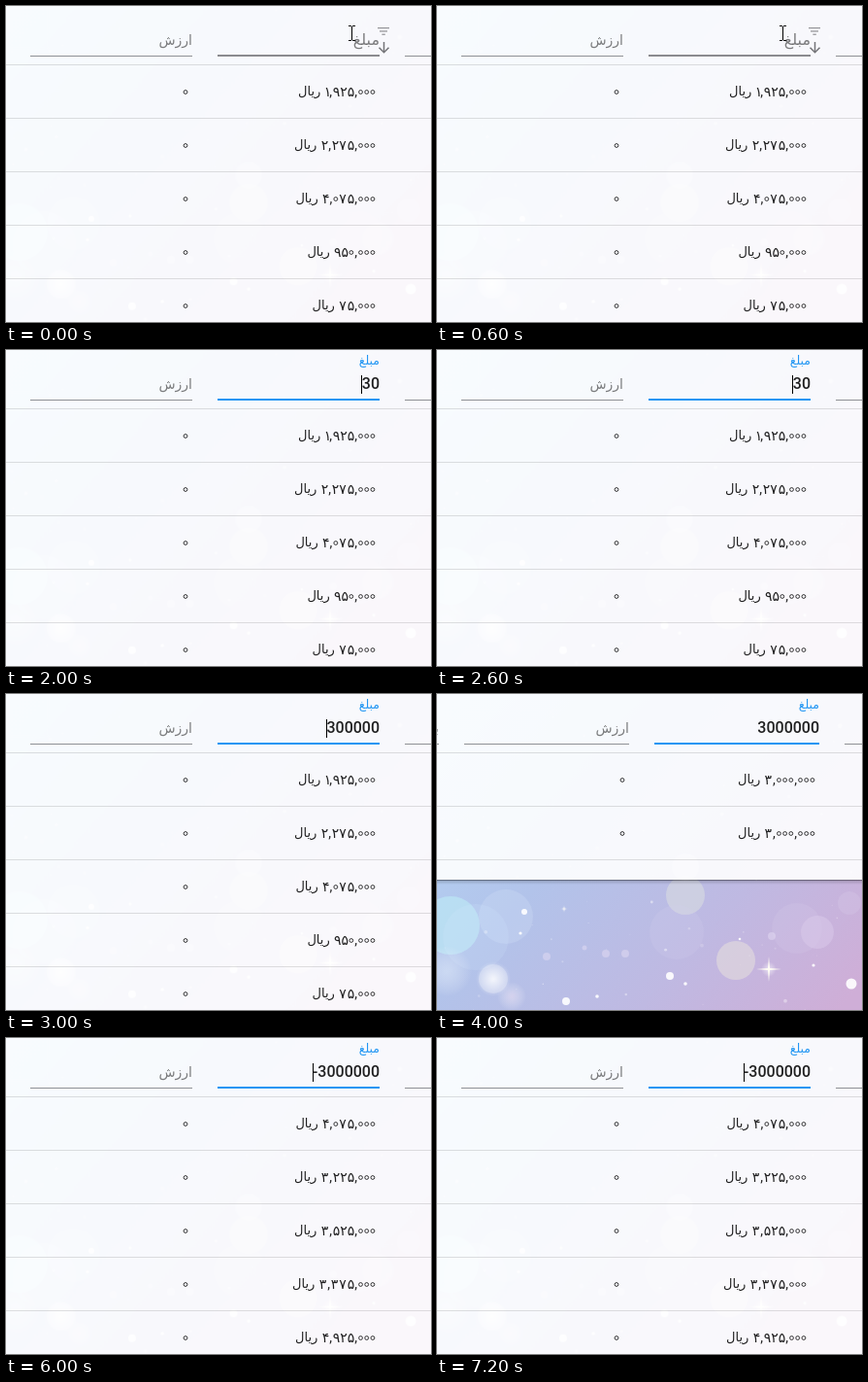
An HTML page with a canvas for the animation above (8 s loop, 438 by 325 pixels).

```html
<!DOCTYPE html>
<html lang="fa">
<head>
<meta charset="utf-8">
<title>Column filter</title>
<style>
  html, body { margin: 0; width: 100%; height: 100%; overflow: hidden; background: #fff; }
  canvas { display: block; }
</style>
</head>
<body>
<canvas id="stage" width="438" height="325"></canvas>
<script>
const W = 438, H = 325, LOOP = 8000;
const SHRINK = .977; // the page is narrower while the scrollbar shows
const BLUE = '#2196f3', INK = 'rgba(0,0,0,.87)', GREY = 'rgba(0,0,0,.5)';
const ARABIC = '"DejaVu Sans", sans-serif', LATIN = 'Roboto, sans-serif';
const ctx = document.getElementById('stage').getContext('2d');

const ALL = ['۱,۹۲۵,۰۰۰', '۲,۲۷۵,۰۰۰', '۴,۰۷۵,۰۰۰', '۹۵۰,۰۰۰', '۷۵,۰۰۰'];
const EXACT = ['۳,۰۰۰,۰۰۰', '۳,۰۰۰,۰۰۰'];
const ABOVE = ['۴,۰۷۵,۰۰۰', '۳,۲۲۵,۰۰۰', '۳,۵۲۵,۰۰۰', '۳,۳۷۵,۰۰۰', '۴,۹۲۵,۰۰۰'];

const STATES = [
  { at: 0, rows: ALL, idle: true },
  { at: 1000, rows: ALL, value: '' },
  { at: 2000, rows: ALL, value: '30', caret: true },
  { at: 3000, rows: ALL, value: '300000', caret: true },
  { at: 4000, rows: EXACT, value: '3000000', short: true },
  { at: 6000, rows: ABOVE, value: '-3000000', caret: true }
];

function rect(g, x, y, w, h, color) {
  g.fillStyle = color;
  g.fillRect(x, y, w, h);
}

function disc(g, x, y, r, color, alpha, soft) {
  g.globalAlpha = alpha;
  g.fillStyle = color;
  if (soft) {
    const glow = g.createRadialGradient(x, y, 0, x, y, r);
    glow.addColorStop(0, color);
    glow.addColorStop(1, 'rgba(255,255,255,0)');
    g.fillStyle = glow;
  }
  g.beginPath();
  g.arc(x, y, r, 0, Math.PI * 2);
  g.fill();
  g.globalAlpha = 1;
}

function star(g, x, y, r) {
  disc(g, x, y, r * .6, '#fff', .6, true);
  g.fillStyle = '#fffdf4';
  g.beginPath();
  for (let i = 0; i < 8; i++) {
    const a = i * Math.PI / 4, d = i % 2 ? r * .11 : r;
    g.lineTo(x + d * Math.cos(a), y + d * Math.sin(a));
  }
  g.fill();
}

function makeBackdrop() {
  const c = document.createElement('canvas');
  c.width = Math.ceil(W / SHRINK);
  c.height = Math.ceil(H / SHRINK);
  const g = c.getContext('2d');
  const sky = g.createLinearGradient(20, 0, 400, 340);
  sky.addColorStop(0, '#b4d6f6');
  sky.addColorStop(.38, '#b2c3ea');
  sky.addColorStop(.7, '#bfb9e2');
  sky.addColorStop(1, '#cfaed7');
  rect(g, 0, 0, c.width, c.height, sky);

  disc(g, 14, 238, 30, '#bdeaf6', .65);
  disc(g, 71, 229, 28, '#cfdcf5', .3);
  disc(g, 256, 207, 20, '#d9dde2', .6);
  disc(g, 247, 245, 28, '#d2cdea', .2);
  disc(g, 371, 241, 26, '#d3c6e8', .25);
  disc(g, 392, 245, 17, '#dccdec', .45);
  disc(g, 308, 274, 20, '#e2dade', .65);
  disc(g, 425, 215, 12, '#dcd0ea', .25);
  disc(g, 40, 250, 34, '#d3e8fa', .15);
  disc(g, 256, 178, 14, '#ffffff', .22);
  disc(g, 58, 293, 18, '#ffffff', .8, true);
  disc(g, 58, 293, 15, '#ffffff', .25);
  disc(g, 10, 285, 26, '#e4eefa', .5, true);
  disc(g, 77, 311, 15, '#f4e4f4', .5, true);

  // bright sparks
  for (const [x, y, r] of [[90, 224, 3], [86, 246, 1.6], [240, 290, 4], [133, 316, 4],
    [427, 298, 5.5], [165, 311, 1.8], [256, 298, 1.8], [312, 252, 1.3], [388, 279, 1.6]])
    disc(g, x, y, r, '#fff', .9);
  for (const [x, y, r] of [[113, 270, 4], [345, 249, 4], [174, 267, 4], [194, 267, 4], [152, 261, 2.5]])
    disc(g, x, y, r, '#e4dcf4', .5);

  let seed = 11;
  const rnd = () => (seed = seed * 16807 % 2147483647) / 2147483647;
  for (let i = 0; i < 90; i++)
    disc(g, rnd() * c.width, rnd() * c.height, .4 + rnd() * rnd() * 2, '#fff', .1 + rnd() * .35);

  star(g, 342, 283, 13);
  star(g, 131, 221, 4);
  return c;
}

function rtl(text, x, y, size, color) {
  ctx.font = size + 'px ' + ARABIC;
  ctx.direction = 'rtl';
  ctx.textAlign = 'right';
  ctx.fillStyle = color;
  ctx.fillText(text, x, y);
}

function zero(x, y) {
  ctx.strokeStyle = INK;
  ctx.lineWidth = .9;
  ctx.beginPath();
  ctx.arc(x, y, 1.9, 0, Math.PI * 2);
  ctx.stroke();
}

// Sets digits from right to left, spaced by their ink; returns the left edge.
function number(text, right, base) {
  const gap = .5;
  let x = right;
  ctx.direction = 'ltr';
  ctx.textAlign = 'left';
  for (const ch of [...text].reverse()) {
    if (ch === '۰') {
      zero(x - 3.1, base - 4.5);
      x -= 6.2;
      continue;
    }
    ctx.font = '14px ' + (ch === ',' ? LATIN : ARABIC);
    ctx.fillStyle = INK;
    const m = ctx.measureText(ch);
    ctx.fillText(ch, x - gap / 2 - m.actualBoundingBoxRight, base);
    x -= m.actualBoundingBoxLeft + m.actualBoundingBoxRight + gap;
  }
  return x;
}

function strokePath(points, color, width) {
  ctx.strokeStyle = color;
  ctx.lineWidth = width;
  ctx.beginPath();
  for (const [x, y] of points) ctx.lineTo(x, y);
  ctx.stroke();
}

function drawIdleField() {
  rtl('مبلغ', 385, 40, 16, GREY);
  rect(ctx, 218, 50, 167, 2, '#8b8b8f');
  rect(ctx, 383, 22, 12, 1.3, '#98989c');
  rect(ctx, 385, 25.3, 8, 1.3, '#98989c');
  rect(ctx, 387.4, 28.6, 3.4, 1.3, '#98989c');
  strokePath([[389.5, 37], [389.5, 47.5]], '#747478', 1.5);
  strokePath([[384.5, 42.8], [389.5, 47.8], [394.5, 42.8]], '#747478', 1.5);
  // text cursor
  rect(ctx, 356, 21, 1, 14, '#000');
  for (const y of [20, 35]) {
    rect(ctx, 353, y, 3, 1, '#000');
    rect(ctx, 357, y, 3, 1, '#000');
  }
}

function drawActiveField(s, right, width) {
  rtl('مبلغ', right, 15, 12.5, BLUE);
  rect(ctx, right - width, 50, width, 2, BLUE);
  ctx.font = '500 16px ' + LATIN;
  ctx.direction = 'ltr';
  ctx.textAlign = 'right';
  ctx.fillStyle = INK;
  ctx.fillText(s.value, right, 40);
  if (s.caret)
    rect(ctx, Math.floor(right - ctx.measureText(s.value).width), 26, 1, 19, '#000');
}

function drawTable(s) {
  const right = s.short ? 394 : 385, side = s.short ? 198 : 192;
  const width = s.short ? 170 : 167, rule = '#8f9195';

  rtl('ارزش', side, 40, 14, GREY);
  rect(ctx, side - width, 51, width, 1, rule);
  rect(ctx, right + 26, 51, W, 1, rule);
  if (s.short) {
    rtl('بها', 2, 40, 14, GREY);
    rect(ctx, 0, 51, 2, 1, rule);
  }
  if (s.idle) drawIdleField();
  else drawActiveField(s, right, width);

  rect(ctx, 0, 60, W, 1, 'rgba(0,0,0,.12)');
  s.rows.forEach((amount, i) => {
    const y = 88 + i * 55;
    const left = number(amount, right - 4, y + 5);
    rtl('ریال', left - 4, y + 4, 13, INK);
    zero(side - 7, y + .5);
    rect(ctx, 0, y + 27, W, 1, 'rgba(0,0,0,.12)');
  });
}

const backdrop = makeBackdrop();

function draw(time) {
  const s = STATES.filter(state => state.at <= time).pop();
  const bottom = s.short ? 191 : H, scale = s.short ? 1 : SHRINK;
  ctx.drawImage(backdrop, 0, 0, backdrop.width * scale, backdrop.height * scale);
  rect(ctx, 0, 0, W, bottom, 'rgba(255,255,255,.9)');
  if (s.short) {
    const shade = ctx.createLinearGradient(0, bottom, 0, bottom + 5);
    shade.addColorStop(0, 'rgba(0,0,0,.22)');
    shade.addColorStop(1, 'rgba(0,0,0,0)');
    rect(ctx, 0, bottom, W, 5, shade);
    rect(ctx, 0, bottom, W, 1, 'rgba(0,0,0,.3)');
  }
  drawTable(s);
}

function tick() {
  draw(performance.now() % LOOP);
  requestAnimationFrame(tick);
}
tick();
</script>
</body>
</html>
```
